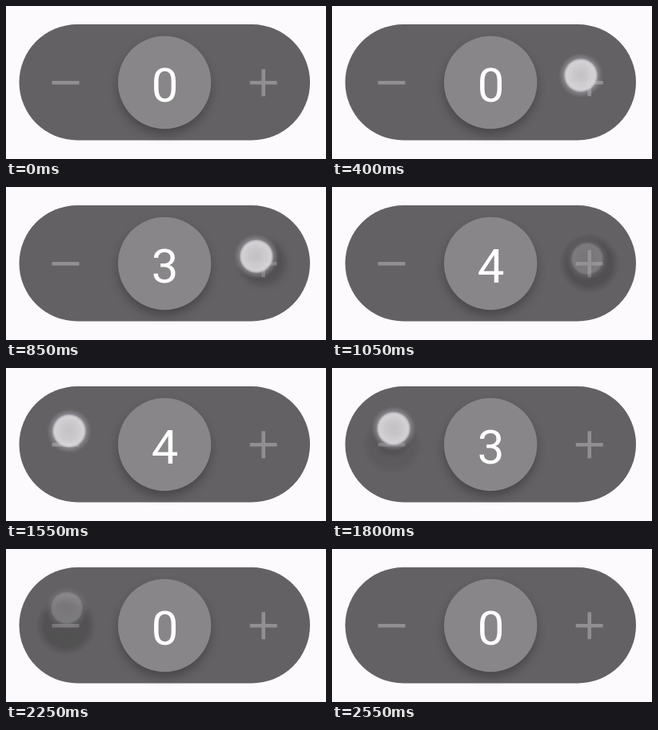
Recreate the animation shown at these times as an HTML page. Size 400x192 px, loop 2700 ms.

```html
<!DOCTYPE html>
<html lang="en">
<head>
<meta charset="utf-8">
<title>Stepper</title>
<style>
  html, body { margin: 0; width: 100%; height: 100%; overflow: hidden; background: #fcfafd; }
  svg { display: block; width: 100vw; height: 100vh; }
  text { font: 400 60px Roboto, Arial, sans-serif; fill: #fff; text-anchor: middle; }
  .sign { fill: none; stroke: #918f91; stroke-width: 4.6; }
</style>
</head>
<body>
<svg viewBox="0 0 400 192">
  <defs>
    <filter id="soft" x="-30%" y="-30%" width="160%" height="160%">
      <feGaussianBlur stdDeviation="7"/>
    </filter>
    <radialGradient id="ink">
      <stop offset="0" stop-color="#000"/>
      <stop offset=".72" stop-color="#000"/>
      <stop offset="1" stop-color="#000" stop-opacity="0"/>
    </radialGradient>
    <radialGradient id="finger">
      <stop offset="0" stop-color="#cbc9cb"/>
      <stop offset=".35" stop-color="#d2d0d2"/>
      <stop offset=".64" stop-color="#dddbdd"/>
      <stop offset=".71" stop-color="#d2d0d6" stop-opacity=".85"/>
      <stop offset=".77" stop-color="#b4b2bc" stop-opacity=".45"/>
      <stop offset="1" stop-color="#a09ea6" stop-opacity="0"/>
    </radialGradient>
  </defs>
  <rect width="400" height="192" fill="#fcfafd"/>
  <rect x="16.5" y="23" width="363.5" height="145.5" rx="72.75" fill="#636163"/>
  <circle cx="198" cy="103" r="57" fill="#000" opacity=".3" filter="url(#soft)"/>
  <path class="sign" d="M57.5 96.3h34"/>
  <path class="sign" d="M304.8 96.3h34M321.8 79.3v34"/>
  <g id="ripples"></g>
  <circle cx="198.2" cy="96" r="58.2" fill="#888688"/>
  <text id="value" x="198.5" y="119.5">0</text>
  <g id="fingers"></g>
</svg>
<script>
const LOOP = 2700, STEP = 50, CLICK = 100;
const byId = id => document.getElementById(id);
const clamp = (v, a = 0, b = 1) => Math.min(b, Math.max(a, v));
const mix = (a, b, k) => a + (b - a) * k;

// start time, finger position, change of the counter
const taps = [
  [400, 311, 87, 1], [575, 305, 83, 1], [750, 313, 87, 1], [900, 319, 90, 1],
  [1550, 79, 79, -1], [1725, 77, 76, -1], [1925, 75, 71.5, -1], [2100, 76, 74, -1]
].map(([start, x, y, delta]) => ({
  start, x, y, delta,
  homeX: delta > 0 ? 322 : 75,
  ripple: addCircle('ripples', 'url(#ink)'),
  finger: addCircle('fingers', 'url(#finger)')
}));

function addCircle(parent, fill) {
  const c = document.createElementNS('http://www.w3.org/2000/svg', 'circle');
  c.setAttribute('fill', fill);
  return byId(parent).appendChild(c);
}

function place(c, cx, cy, r, opacity) {
  for (const [k, v] of Object.entries({ cx, cy, r, opacity })) c.setAttribute(k, v);
}

function draw(t) {
  let value = 0;
  for (const tap of taps) {
    const age = t - tap.start;
    if (age >= CLICK) value += tap.delta;

    const press = age < 0 ? 0 : clamp((175 - age) / 75);
    place(tap.finger, tap.x, tap.y, mix(26.5, 28, press), press * 0.93);

    const grow = clamp(age / 125);
    const ink = Math.min(grow, clamp((350 - age) / 200));
    place(tap.ripple, mix(tap.x, tap.homeX, grow), mix(tap.y, 96, grow),
      mix(8, 38, grow), ink * 0.15);
  }
  byId('value').textContent = value;
}

const origin = performance.now();
function tick() {
  const t = (performance.now() - origin) % LOOP;
  draw(Math.floor(t / STEP) * STEP);
  requestAnimationFrame(tick);
}
tick();
</script>
</body>
</html>
```
